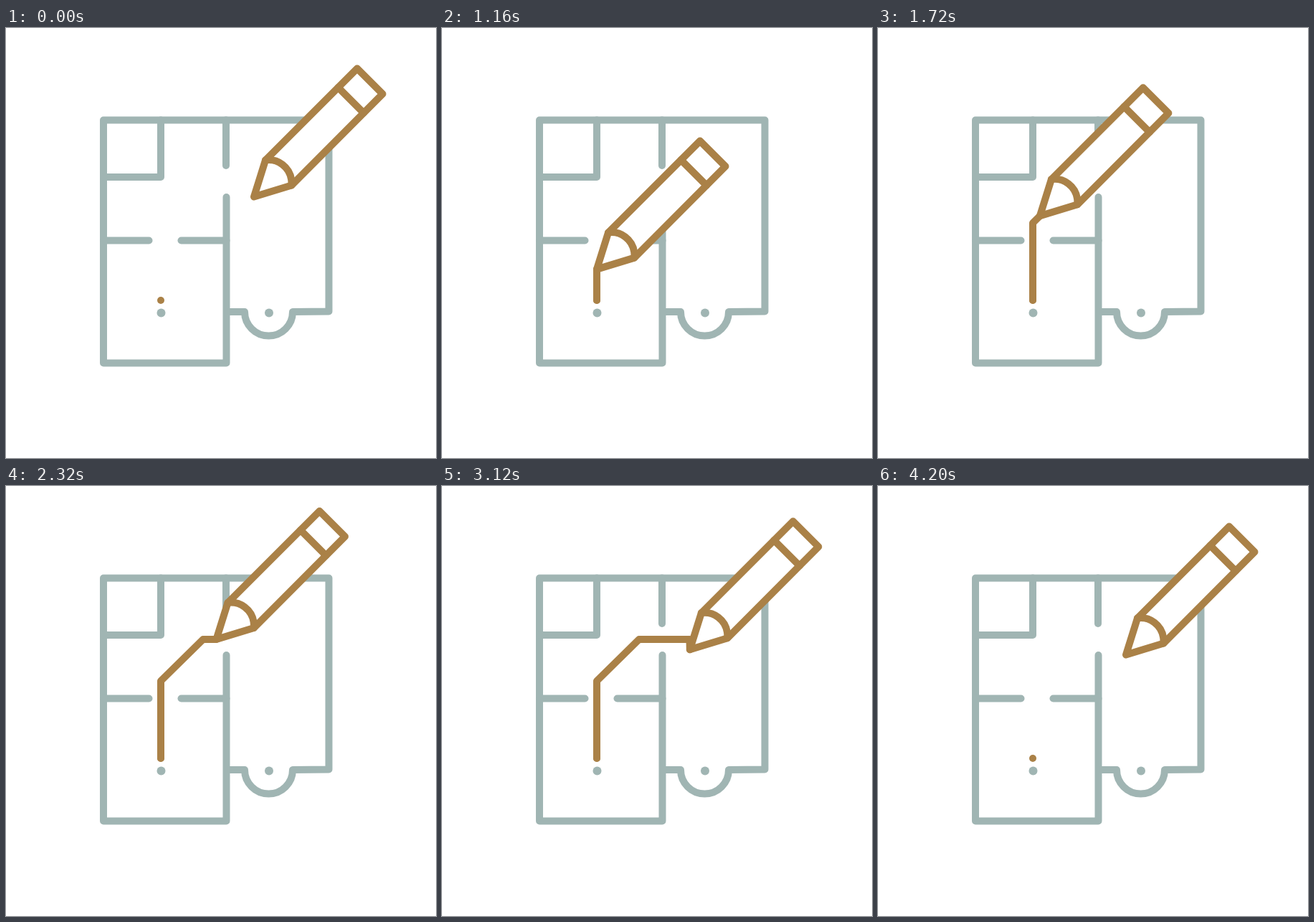
An HTML page with a canvas that plays this animation: 600x600 px, repeating every 4.22 s.

```html
<!DOCTYPE html>
<html lang="en">
<head>
<meta charset="utf-8">
<title>Floor plan</title>
<style>
  html, body { margin: 0; width: 100%; height: 100%; overflow: hidden; background: #fff; }
  canvas { display: block; width: 600px; height: 600px; }
</style>
</head>
<body>
<canvas id="stage"></canvas>
<script>
const LOOP = 4220;
const WALL = '#a0b5b3';
const WOOD = '#aa8147';

const canvas = document.getElementById('stage');
const scale = window.devicePixelRatio || 1;
canvas.width = canvas.height = 600 * scale;
const ctx = canvas.getContext('2d');
ctx.scale(scale, scale);
ctx.lineWidth = 10;
ctx.lineCap = ctx.lineJoin = 'round';

const rest = [346, 235.5];
const route = [[216, 380], [216, 272], [275, 214], [345.5, 214], rest];
const stops = [830, 1590, 2090, 2776, 3340];  // when the tip reaches each route point
const approach = 258;
const erase = [3600, 4180];

const lengths = route.slice(1).map((p, i) => Math.hypot(p[0] - route[i][0], p[1] - route[i][1]));
const total = lengths.reduce((a, b) => a + b);

function ease(t, from, to) {
  const u = Math.min(1, Math.max(0, (t - from) / (to - from)));
  return u * u * (3 - 2 * u);
}

function mix(a, b, k) {
  return [a[0] + (b[0] - a[0]) * k, a[1] + (b[1] - a[1]) * k];
}

function trace(points) {
  ctx.beginPath();
  points.forEach(p => ctx.lineTo(p[0], p[1]));
}

function line(...points) {
  trace(points);
  ctx.stroke();
}

function dot(x, y, r) {
  ctx.beginPath();
  ctx.arc(x, y, r, 0, Math.PI * 2);
  ctx.fill();
}

function drawPlan() {
  ctx.strokeStyle = ctx.fillStyle = WALL;
  ctx.beginPath();
  ctx.moveTo(307.5, 396);
  ctx.lineTo(333, 396);
  ctx.arc(366.5, 396, 33.5, Math.PI, 0, true);
  ctx.lineTo(450.5, 395.5);
  ctx.lineTo(450.5, 128.5);
  ctx.lineTo(136, 128.5);
  ctx.lineTo(136, 467.5);
  ctx.lineTo(307.5, 467.5);
  ctx.lineTo(307.5, 236);
  ctx.stroke();
  line([216, 128.5], [216, 208], [136, 208]);
  line([307, 128.5], [307, 192]);
  line([136, 296.5], [199.5, 296.5]);
  line([244.5, 296.5], [307.5, 296.5]);
  dot(216.5, 397.5, 6);
  dot(367, 397.5, 6);
}

function drawRoute(length) {
  const points = [route[0]];
  for (let i = 0; i < lengths.length && length > 0; i++) {
    points.push(mix(route[i], route[i + 1], Math.min(1, length / lengths[i])));
    length -= lengths[i];
  }
  ctx.fillStyle = ctx.strokeStyle = WOOD;
  dot(route[0][0], route[0][1], 5);
  if (points.length > 1) line(...points);
}

function drawPencil(tip) {
  ctx.save();
  ctx.translate(tip[0], tip[1]);
  ctx.strokeStyle = WOOD;
  ctx.fillStyle = '#fff';
  trace([[0, 0], [16, -51], [144, -179], [179.5, -143.5], [52.5, -16]]);
  ctx.closePath();
  ctx.fill();
  ctx.stroke();
  line([117.5, -152.5], [153, -117]);
  ctx.beginPath();
  ctx.arc(20.5, -19.5, 32, Math.atan2(-31.5, -4.5), Math.atan2(3.5, 32));
  ctx.stroke();
  ctx.restore();
}

// Tip position and drawn length at time t
function pose(t) {
  let tip = mix(rest, route[0], ease(t, approach, stops[0]));
  let length = 0;
  for (let i = 0; i < lengths.length; i++) {
    if (t < stops[i]) break;
    const k = ease(t, stops[i], stops[i + 1]);
    tip = mix(route[i], route[i + 1], k);
    length += lengths[i] * k;
  }
  if (t > erase[0]) length = total * (1 - ease(t, erase[0], erase[1]));
  return { tip, length };
}

function render(t) {
  const { tip, length } = pose(t);
  ctx.fillStyle = '#fff';
  ctx.fillRect(0, 0, 600, 600);
  drawPlan();
  drawRoute(length);
  drawPencil(tip);
}

let start = null;
function tick(now) {
  if (start === null) start = now;
  render((now - start) % LOOP);
  requestAnimationFrame(tick);
}
render(0);
requestAnimationFrame(tick);
</script>
</body>
</html>
```
